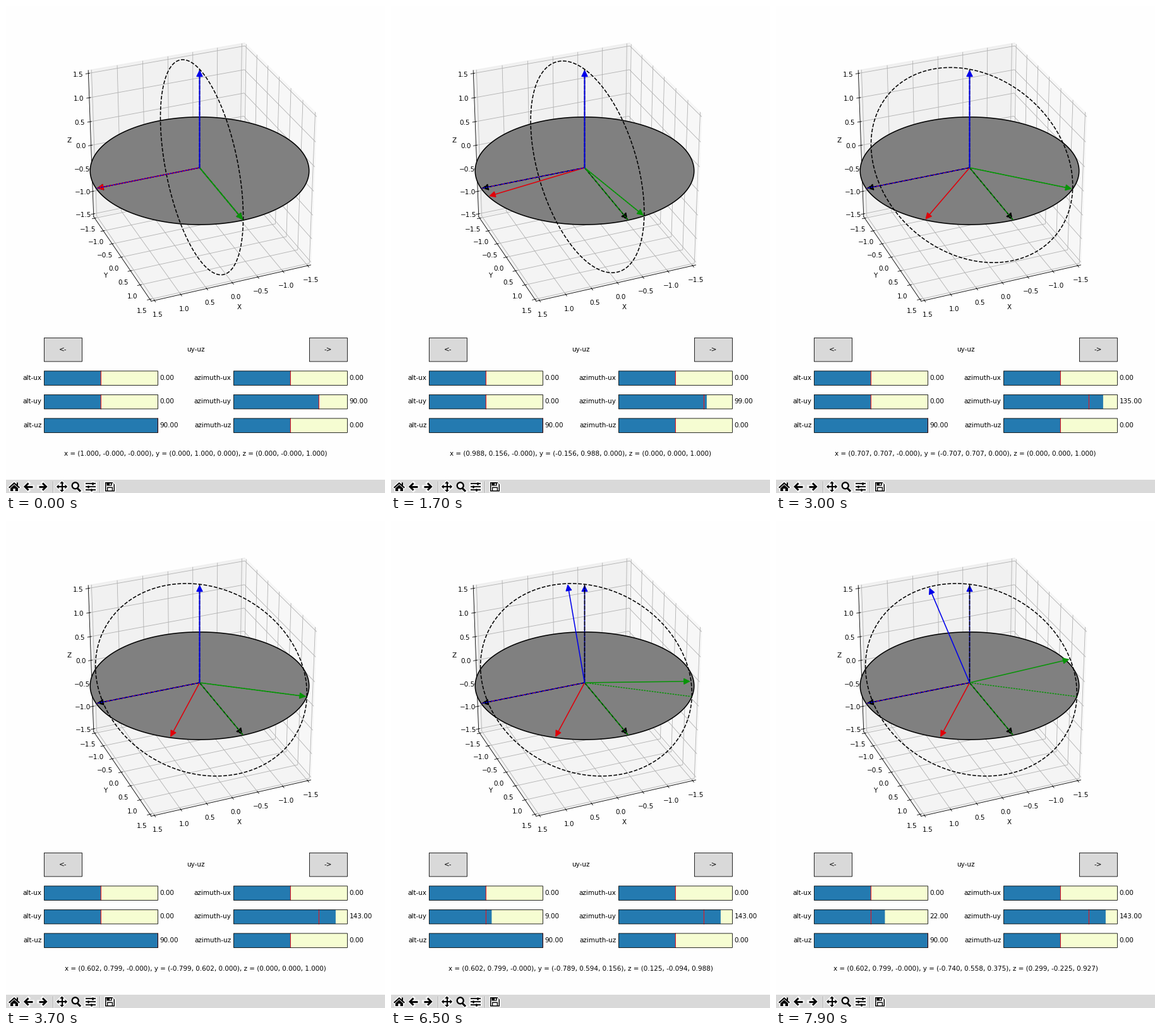
These frames come from a looping animation (600x771 px, 8000 ms). A matplotlib script:

```python
import numpy as np
import matplotlib.pyplot as plt
from matplotlib.animation import FuncAnimation
from matplotlib.patches import Circle, FancyArrowPatch, Polygon, Rectangle

W, H, DPI = 600, 771, 75
STEP_MS, N_FRAMES = 100, 80
ELEV, AZIM = np.radians(29.4), np.radians(67.8)
CENTER, UNIT, RADIUS = (306.5, 256.0), 86.49, 2
RED, GREEN, BLUE = "#e0000a", "#089408", "#0000ea"
HALO = "#f7f7f7"

# (time in ms, slider value)
AZIMUTHS = [(0, 90), (1000, 91), (1100, 92), (1300, 93), (1700, 99),
            (1900, 104), (2000, 112), (2300, 125), (2600, 132), (2900, 133),
            (3000, 135), (3300, 138), (3400, 141), (3700, 143)]
ALTITUDES = [(0, 0), (5900, 2), (6200, 5), (6300, 6), (6500, 9), (6800, 12),
             (6900, 14), (7100, 16), (7300, 17), (7400, 18), (7600, 20),
             (7700, 21), (7900, 22)]

plt.rcParams.update({"font.family": "DejaVu Sans", "font.size": 10})
fig = plt.figure(figsize=(W / DPI, H / DPI), dpi=DPI, facecolor="#fefefe")


def make_box():
    """The empty 3D box with its grid and ticks."""
    side = 480
    ax = fig.add_axes([60 / W, (H - 502.5) / H, side / W, side / H],
                      projection="3d", facecolor="none")
    lim = 1.5 * 25 / 24
    ticks = np.arange(-1.5, 1.6, 0.5)
    ax.set(xlim=(-lim, lim), ylim=(-lim, lim), zlim=(-lim, lim),
           xticks=ticks, yticks=ticks, zticks=ticks,
           xlabel="X", ylabel="Y", zlabel="Z")
    ax.set_box_aspect((1, 1, 1), zoom=3 ** 0.5 / 1.8294640721620434)
    ax.view_init(np.degrees(ELEV), np.degrees(AZIM))


make_box()
ax = fig.add_axes([0, 0, 1, 1], facecolor="none", zorder=5)
ax.set(xlim=(0, W), ylim=(H, 0))
ax.axis("off")


def project(points):
    """Perspective view of 3D points as stage pixels."""
    x, y, z = np.asarray(points, float).T
    side = y * np.cos(AZIM) - x * np.sin(AZIM)
    toward = x * np.cos(AZIM) + y * np.sin(AZIM)
    up = z * np.cos(ELEV) - toward * np.sin(ELEV)
    depth = toward * np.cos(ELEV) + z * np.sin(ELEV)
    scale = UNIT / (1 - depth / 30)
    return np.column_stack([CENTER[0] + side * scale, CENTER[1] - up * scale])


def ring(a, b):
    t = np.linspace(0, 2 * np.pi, 181)[:, None]
    return project(RADIUS * (np.cos(t) * np.array(a) + np.sin(t) * np.array(b)))


def tip(v):
    return project([RADIUS * np.asarray(v, float)])[0]


def arrow(v, color, ls="-", z=5, head="-|>"):
    patch = FancyArrowPatch(CENTER, tip(v), arrowstyle=head, color=color,
                            mutation_scale=20, lw=1.5, ls=ls, shrinkA=0,
                            shrinkB=1, snap=False, zorder=z)
    return ax.add_patch(patch)


def ray(v, color, ls="-", z=4):
    return arrow(v, color, ls, z, head="-")


def label(x, y, text, ha="center", va="center"):
    return ax.text(x, y, text, ha=ha, va=va, zorder=8)


def box(x, y, w, h, face, edge="none", z=6):
    return ax.add_patch(Rectangle((x, y), w, h, fc=face, ec=edge, lw=0.8,
                                  snap=False, zorder=z))


class Slider:
    def __init__(self, x, y, name, span, start):
        self.span = span
        left, top = x + 0.4, y + 0.4
        box(left, top, 180, 22.5, "#f6fdd2")
        self.bar = box(left, top, 0, 22.5, "#247ab0", z=7)
        mark = left + 90 + 90 * start / span
        ax.plot([mark, mark], [top, top + 22.5], color="#f01018", lw=1,
                snap=False, zorder=8)
        box(left, top, 180, 22.5, "none", "black", z=9)
        label(x - 3.6, y + 11.25, name, "right")
        self.text = label(x + 183.6, y + 11.25, "", "left")
        self.set(start)

    def set(self, value):
        self.bar.set_width(90 + 90 * value / self.span)
        self.text.set_text(f"{value:.2f}")


def shape(points, halo=True):
    if halo:
        ax.add_patch(Polygon(points, fc=HALO, ec=HALO, lw=3, zorder=7))
    ax.add_patch(Polygon(points, fc="black", lw=0, zorder=8))


def stroke(xs, ys, lw, color="black"):
    if color == "black":
        ax.plot(xs, ys, color=HALO, lw=lw + 2.6, zorder=7,
                solid_capstyle="projecting")
    ax.plot(xs, ys, color=color, lw=lw, zorder=8, solid_capstyle="butt",
            solid_joinstyle="miter")


def make_toolbar():
    y = 761
    box(0, 750, W, 21, "#d9d9d9")
    # home
    shape([(4, y + 1), (13, y - 7), (22, y + 1), (20.5, y + 2.5), (13, y - 4.2),
           (5.5, y + 2.5)])
    shape([(7, y + 2.4), (13, y - 2.9), (19, y + 2.4), (19, y + 7), (14.7, y + 7),
           (14.7, y + 3), (11.3, y + 3), (11.3, y + 7), (7, y + 7)])
    shape([(17, y - 6.5), (19, y - 6.5), (19, y - 1.5), (17, y - 3.2)], False)
    # back and forward
    for cx, d in ((35.5, -1), (58, 1)):
        stroke([cx - 6.5 * d, cx + 5 * d], [y, y], 2.8)
        stroke([cx, cx + 5.5 * d, cx], [y - 5.5, y, y + 5.5], 2.8)
    for x in (73.5, 147.5):
        stroke([x, x], [752, 770], 1, "#b0b0b0")
        stroke([x + 1, x + 1], [752, 770], 1, HALO)
    # pan
    cx = 88.5
    stroke([cx - 6, cx + 6], [y, y], 2)
    stroke([cx, cx], [y - 6, y + 6], 2)
    for dx, dy in ((1, 0), (-1, 0), (0, 1), (0, -1)):
        shape([(cx + a * dx - b * dy, y + a * dy + b * dx)
               for a, b in ((8.6, 0), (5, 3.4), (5, -3.4))])
    # zoom
    stroke([113, 118], [y + 2.5, y + 7.5], 3)
    ax.add_patch(Circle((109.7, y - 1.7), 5, fc=HALO, ec="black", lw=2.2, zorder=8))
    # subplot settings
    for dy, knob in ((-5, 136.5), (0, 129.5), (5, 135)):
        stroke([125.5, 141.5], [y + dy, y + dy], 1.7)
        stroke([knob, knob], [y + dy - 2.2, y + dy + 2.2], 2.4)
    # save
    shape([(157, y - 7), (168.5, y - 7), (172, y - 3.5), (172, y + 7.5), (157, y + 7.5)])
    box(158.5, y - 5.5, 12, 11.5, HALO, z=9)
    box(159.5, y - 6, 8, 4.5, "black", z=10)
    box(164, y - 5.2, 2, 2.6, HALO, z=11)
    box(160, y + 0.6, 9, 6, "black", z=10)
    box(161.3, y + 2, 6.4, 4, HALO, z=11)


X, Y, Z = np.eye(3)
ax.add_patch(Polygon(ring(X, Y), fc="#808080", ec="black", lw=1.5, zorder=2))
circle, = ax.plot([], [], "k--", lw=1.5, zorder=3)

# fixed reference axes
ray(X, RED)
ray(Y, GREEN)
arrow(X, "black", "--")
arrow(Y, "black", "--")
ray(Y, GREEN, ":", z=5.2)
arrow(Z, BLUE)
ray(Z, "black", "--", z=5.1)

# turning frame
red = arrow(X, RED, z=6)
green = arrow(Y, GREEN, z=6)
blue = arrow(Z, BLUE, z=6)
ray(X, BLUE, ":", z=7)
heading = ray(Y, GREEN, ":", z=5.5)

for x, text in ((60, "<-"), (480, "->")):
    box(x + 0.4, 525.4, 60, 37.5, "#d9d9d9", "black")
    label(x + 30, 543.75, text)
label(300, 543.75, "uy-uz")
Slider(60, 577.5, "alt-ux", 90, 0)
alt_slider = Slider(60, 615, "alt-uy", 90, 0)
Slider(60, 652.5, "alt-uz", 90, 90)
Slider(360, 577.5, "azimuth-ux", 180, 0)
az_slider = Slider(360, 615, "azimuth-uy", 180, 90)
Slider(360, 652.5, "azimuth-uz", 180, 0)
readout = label(300, 712.5, "", va="baseline")
make_toolbar()


def value_at(steps, ms):
    return [v for t, v in steps if t <= ms][-1]


def triple(v):
    return "({:.3f}, {:.3f}, {:.3f})".format(*v)


def update(i):
    ms = i * STEP_MS
    az_deg, alt_deg = value_at(AZIMUTHS, ms), value_at(ALTITUDES, ms)
    az, alt = np.radians(az_deg), np.radians(alt_deg)
    flat = (np.cos(az), np.sin(az), 0)
    x = (np.sin(az), -np.cos(az), -0.0)
    y = (np.cos(alt) * flat[0], np.cos(alt) * flat[1], np.sin(alt))
    z = (-np.sin(alt) * flat[0], -np.sin(alt) * flat[1], np.cos(alt))
    if alt_deg == 0:
        z = (0.0, -0.0 if az_deg == 90 else 0.0, 1.0)

    for patch, v in ((red, x), (green, y), (blue, z), (heading, flat)):
        patch.set_positions(CENTER, tip(v))
    circle.set_data(*ring(flat, Z).T)
    alt_slider.set(alt_deg)
    az_slider.set(az_deg)
    readout.set_text(f"x = {triple(x)}, y = {triple(y)}, z = {triple(z)}")
    return red, green, blue, heading, circle, readout


anim = FuncAnimation(fig, update, frames=N_FRAMES, init_func=lambda: update(0),
                     interval=STEP_MS, repeat=True, repeat_delay=0, blit=False)
plt.show()
```
